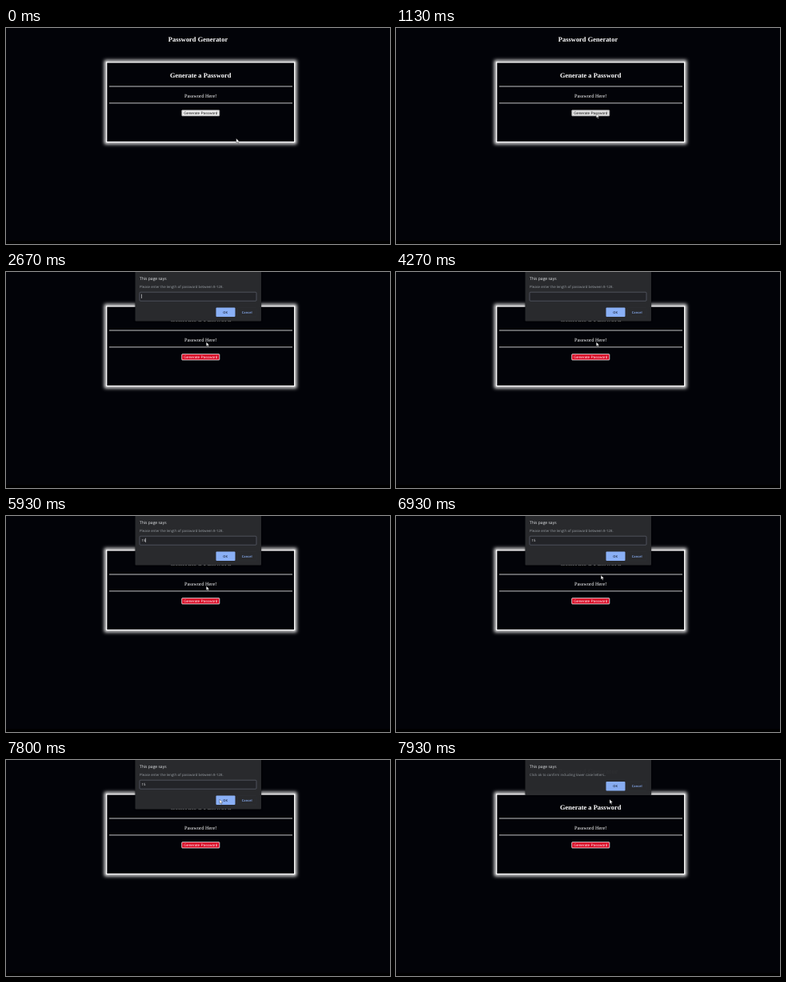
These frames come from a looping animation (480 by 270 pixels, 8000 ms). An HTML page:

```html
<!DOCTYPE html>
<html lang="en">
<head>
<meta charset="utf-8">
<title>Password Generator</title>
<style>
html, body { margin: 0; height: 100%; overflow: hidden; background: #020308; }
svg { display: block; width: 100vw; height: 100vh; }
text { text-rendering: geometricPrecision; }
.serif { font-family: "Liberation Serif", serif; fill: #fff; text-anchor: middle; }
.head { font-size: 8.45px; font-weight: bold; }
.label { font: 4.75px "Liberation Sans", sans-serif; text-anchor: middle; }
.dialog { font: 4.34px "Open Sans", sans-serif; fill: #9aa0a6; }
.title { font-size: 5px; fill: #e8eaed; }
.action { font-size: 4px; font-weight: 600; text-anchor: middle; }
</style>
</head>
<body>
<svg viewBox="0 0 480 270">
  <defs>
    <filter id="glow" x="-10%" y="-20%" width="120%" height="140%"><feGaussianBlur stdDeviation="1.9"/></filter>
    <filter id="shade" x="-10%" y="-20%" width="120%" height="150%"><feGaussianBlur stdDeviation="1"/></filter>
    <g id="actions">
      <rect x="262.5" width="24" height="11.5" rx="1" fill="#8ab0f6"/>
      <rect x="289.5" width="23.5" height="11.5" rx="1" fill="#292a2d" stroke="#303339" stroke-width=".4"/>
      <text class="action" x="274.2" y="7.3" fill="#202b45">OK</text>
      <text class="action" x="301.2" y="7.3" fill="#8ab0f6">Cancel</text>
    </g>
  </defs>
  <rect width="480" height="270" fill="#020308"/>
  <rect y="266" width="480" height="4" fill="#000"/>
  <text class="serif head" x="240" y="17">Password Generator</text>

  <rect x="125" y="42.2" width="236.3" height="101" fill="none" stroke="#fff" stroke-width="4" filter="url(#glow)"/>
  <rect x="125.7" y="42.9" width="235" height="99.6" fill="#020308" stroke="#fff" stroke-width="1.3"/>
  <text class="serif head" x="243.2" y="62.2">Generate a Password</text>
  <path d="M129 73H358M129 93.9H358" stroke="#d8d8d8" stroke-width=".9"/>
  <text class="serif" x="243.2" y="86.6" font-size="6.37">Password Here!</text>
  <rect id="button" x="219.8" y="102.7" width="47" height="7.2" rx=".6" stroke-width=".8"/>
  <text id="buttonText" class="label" x="243.3" y="108">Generate Password</text>

  <g id="confirm" class="dialog">
    <rect x="161.5" y="-10" width="157.5" height="55" fill="#000" opacity=".5" filter="url(#shade)"/>
    <rect x="161.5" y="-10" width="157.5" height="54.5" rx="1" fill="#292a2d"/>
    <text class="title" x="167" y="10.4">This page says</text>
    <text x="167" y="20.2">Click ok to confirm including lower case letters..</text>
    <use href="#actions" y="27.6"/>
  </g>
  <g id="prompt" class="dialog">
    <rect x="161.5" y="-10" width="157.5" height="72" fill="#000" opacity=".5" filter="url(#shade)"/>
    <rect x="161.5" y="-10" width="157.5" height="71.5" rx="1" fill="#292a2d"/>
    <text class="title" x="167" y="10.4">This page says</text>
    <text x="167" y="20.2">Please enter the length of password between 8-128.</text>
    <rect x="167" y="25.2" width="146" height="11" rx="1" fill="#232428" stroke="#5f6470" stroke-width=".7"/>
    <text id="entry" x="169.5" y="32.2" fill="#e8eaed"></text>
    <rect id="caret" y="27.7" width=".6" height="5.2" fill="#e8eaed"/>
    <use href="#actions" y="44.5"/>
  </g>
  <path id="cursor" d="M0 0V5.2L1.2 4.2L2.1 6.2L3 5.8L2.1 3.9H3.8Z" fill="#fff" stroke="#111" stroke-width=".35"/>
</svg>
<script>
const LOOP = 8000, STEP = 200 / 3;
const $ = id => document.getElementById(id);
const clamp = x => Math.max(0, Math.min(1, x));
const ease = x => x * x * (3 - 2 * x);

// time, x, y
const route = [[0, 287.8, 138], [200, 287.5, 138], [1067, 250.8, 107.5], [1134, 250.3, 107],
  [2000, 250.3, 107], [2200, 250.3, 87.5], [6667, 250.3, 87.5], [7334, 267, 49.2], [LOOP, 267, 49.2]];

function cursorAt(t) {
  const i = route.findIndex(p => p[0] > t);
  const [a, b] = [route[i - 1], route[i]];
  const k = ease((t - a[0]) / (b[0] - a[0]));
  return [a[1] + (b[1] - a[1]) * k, a[2] + (b[2] - a[2]) * k];
}

function slideIn(el, age) {
  const k = clamp((age + STEP) / (4 * STEP));
  el.setAttribute("opacity", age < 0 ? 0 : 1 - (1 - k) ** 2.6);
  el.setAttribute("transform", `translate(0 ${-12 * (1 - k) ** 2})`);
}

function draw(now) {
  const t = Math.floor((now % LOOP + 4) / STEP) * STEP % LOOP;
  const [x, y] = cursorAt(t);
  $("cursor").setAttribute("transform", `translate(${x} ${y})`);

  const pressed = t > 1460, hover = x < 267 && y < 110;
  $("button").setAttribute("fill", pressed ? "#d8001d" : hover ? "#e4e4e4" : "#f0f0f0");
  $("button").setAttribute("stroke", pressed ? "#fff" : "#999");
  $("buttonText").setAttribute("fill", pressed ? "#fff" : "#111");

  slideIn($("prompt"), t - 1660);
  slideIn($("confirm"), t - 7790);
  if (t > 7790) $("prompt").setAttribute("opacity", clamp((7930 - t) / 130));

  // Each key press restarts the caret blink.
  const typed = t > 4860 ? "15" : t > 4390 ? "1" : "";
  const blinkStart = [1600, 4395, 4865][typed.length];
  $("entry").textContent = typed;
  $("caret").setAttribute("x", 169.4 + 2.48 * typed.length);
  $("caret").setAttribute("opacity", Math.floor((t - blinkStart) / 533) % 2 ? 0 : 1);
}

function tick() {
  draw(performance.now());
  requestAnimationFrame(tick);
}
tick();
</script>
</body>
</html>
```
